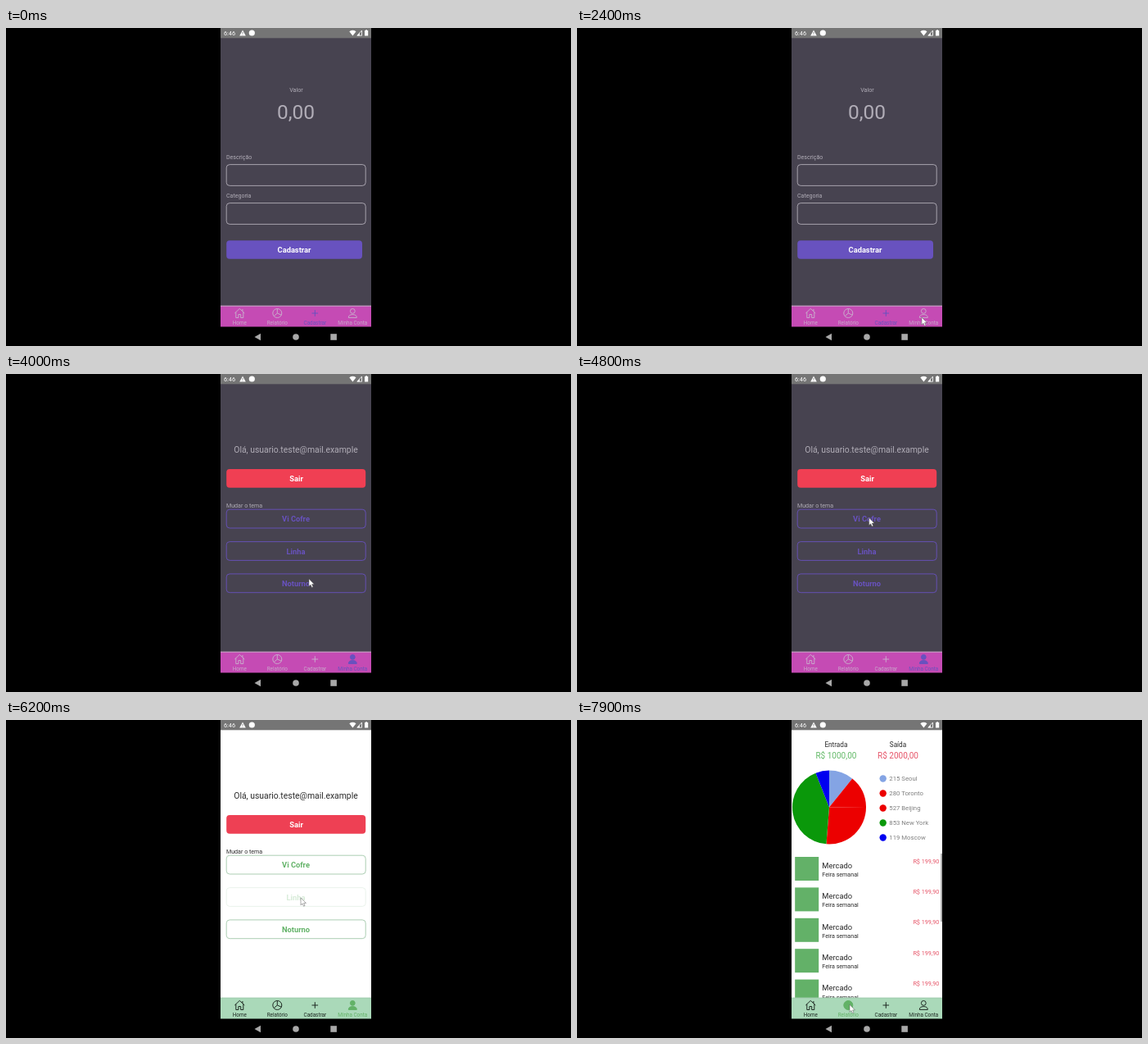
Write an HTML page that moves like this. It is 690 px wide and 388 px high and loops after 8000 ms.

```html
<!DOCTYPE html>
<html lang="pt">
<head>
<meta charset="utf-8">
<title>Controle de gastos</title>
<style>
html, body { margin: 0; height: 100%; overflow: hidden; background: #000; }
svg {
  display: block; width: 100vw; height: 100vh;
  font-family: Roboto, sans-serif;
  --bg: #474350; --text: #b1adb7; --bar: #c54bb4; --edge: #c99bc5; --tab: #c9a9cb;
  --main: #6852bf; --line: #6852bf; --danger: #f03f53;
}
svg.light {
  --bg: #fff; --text: #2b2b2b; --bar: #aad9b9; --edge: #a3cfb1; --tab: #1f2a23;
  --main: #62b267; --line: #a3c9ab; --danger: #ee4054;
}
text { fill: var(--text); }
.bold { font-weight: 700; }
.mid { text-anchor: middle; }
.end { text-anchor: end; }
.tab { color: var(--tab); }
.tab.on { color: var(--main); }
.tab text { fill: currentColor; }
.tab .icon { fill: none; stroke: currentColor; stroke-width: 1; stroke-linejoin: round; }
.tab.on .solid { fill: currentColor; }
</style>
</head>
<body>
<svg id="stage" viewBox="0 0 690 388">
  <defs><clipPath id="page"><rect x="262" y="12" width="184" height="327"/></clipPath></defs>
  <rect width="690" height="388" fill="#000"/>
  <rect x="262" y="12" width="184" height="327.5" fill="var(--bg)"/>

  <rect x="262" width="184" height="12.3" fill="#757575"/>
  <g fill="#fff">
    <text x="266" y="8.8" font-size="7.3" style="fill:#fff">6:46</text>
    <path d="M289 2.5L292.8 9.5H285.2Z"/>
    <path d="M289 5V7M289 7.7V8.5" stroke="#757575" stroke-width=".8"/>
    <circle cx="300.3" cy="6" r="3.6"/>
    <path d="M419.3 4.2Q423.4 1.3 427.5 4.2L423.4 9.4Z"/>
    <path d="M434.5 3V9.2H428.8Z" fill="none" stroke="#fff" stroke-width=".8"/>
    <path d="M431.8 6V9.2H428.8Z"/>
    <path d="M438 3H439.2V2.2H441V3H442.2V9.5H438Z"/>
  </g>

  <g clip-path="url(#page)">
    <g id="register"></g>
    <g id="account"></g>
    <g id="report"></g>
  </g>
  <rect x="262" y="339" width="184" height="25.5" fill="var(--bar)"/>
  <rect x="262" y="338.6" width="184" height="1.2" fill="var(--edge)"/>
  <g id="tabs"></g>

  <g fill="#a9a9a9">
    <path d="M303.5 377L311 372.8V381.2Z"/>
    <circle cx="354" cy="377" r="3.8"/>
    <rect x="396.3" y="373.2" width="7.6" height="7.6"/>
  </g>
  <path id="cursor" d="M0 0V9L2 7.2L3.5 10.4L5 9.7L3.6 6.6H6.4Z" fill="#fff" stroke="#555" stroke-width=".5"/>
</svg>
<script>
const $ = id => document.getElementById(id);
const LOOP = 8000, STEP = 100;

const text = (x, y, size, str, cls = '', color = 'var(--text)') =>
  `<text x="${x}" y="${y}" font-size="${size}" class="${cls}" style="fill:${color}">${str}</text>`;
const box = (y, h, fill, stroke, w = 170) =>
  `<rect x="269.2" y="${y}" width="${w}" height="${h}" rx="4" fill="${fill}" stroke="${stroke}" stroke-width=".9"/>`;
const themeButton = (y, name) =>
  box(y, 22.8, 'none', 'var(--line)') + text(354, y + 15.2, 9.3, name, 'bold mid', 'var(--main)');

$('register').innerHTML =
  text(354.5, 77.6, 7.2, 'Valor', 'mid') +
  text(354, 111.3, 24.5, '0,00', 'mid') +
  text(269, 160.2, 7.05, 'Descrição') + box(166.6, 25.8, 'none', 'var(--text)') +
  text(269, 207.4, 7.05, 'Categoria') + box(213.6, 25.8, 'none', 'var(--text)') +
  box(259.3, 22.5, 'var(--main)', 'none', 165.8) +
  text(352, 274.3, 9.3, 'Cadastrar', 'bold mid', '#fff');

$('account').innerHTML =
  text(354, 96.2, 10.4, 'Olá, usuario.teste@mail.example', 'mid') +
  box(116, 22.7, 'var(--danger)', 'none') + text(354.5, 130.9, 9.3, 'Sair', 'bold mid', '#fff') +
  text(269, 162.8, 7.1, 'Mudar o tema') +
  themeButton(165.2, 'Vi Cofre') +
  `<g id="pressed">${themeButton(204.6, 'Linha')}</g>` +
  themeButton(243.9, 'Noturno');

const cities = [
  [215, 'Seoul', '#84a4e4'], [280, 'Toronto', '#ec0000'], [527, 'Beijing', '#ec0000'],
  [853, 'New York', '#0a980a'], [119, 'Moscow', '#0000f0']
];
const total = cities.reduce((sum, [n]) => sum + n, 0);
const rim = n => {
  const a = n / total * 2 * Math.PI;
  return `${308 + 45 * Math.sin(a)} ${106.5 - 45 * Math.cos(a)}`;
};
let used = 0;
const chart = cities.map(([n, city, color], i) => {
  const slice = `<path d="M308 106.5L${rim(used)}A45 45 0 0 1 ${rim(used += n)}Z" fill="${color}"/>`;
  const y = 71.5 + 18 * i;
  return slice + `<circle cx="373.7" cy="${y}" r="4.2" fill="${color}"/>` +
    text(381.3, y + 2.6, 7.75, `${n} ${city}`, '', '#7f7f7f');
}).join('');
const purchases = Array.from({ length: 5 }, (_, i) => {
  const y = 167 + 37.4 * i;
  return `<rect x="266.2" y="${y}" width="29" height="29" fill="#63b168"/>` +
    text(299.3, y + 13.8, 9.4, 'Mercado') +
    text(299.3, y + 24, 7.15, 'Feira semanal') +
    text(442.3, y + 7.6, 7.2, 'R$ 199,90', 'end', '#e65367');
}).join('');
$('report').innerHTML =
  text(316.4, 33.2, 8.2, 'Entrada', 'mid') + text(316.4, 47.2, 10, 'R$ 1000,00', 'mid', '#62b967') +
  text(392, 33.2, 8.2, 'Saída', 'mid') + text(392, 47.2, 10, 'R$ 2000,00', 'mid', '#e65367') +
  chart + purchases + '<rect x="444.2" y="163" width="1.8" height="83" fill="#aaa"/>';

// Icons are drawn around the tab centre.
const tabs = [
  ['Home', '<path d="M-6 0L0-5.6L6 0M-4.5-1.4V5.5H-1.4V1.5H1.4V5.5H4.5V-1.4M3.6-5V-2.2"/>'],
  ['Relatório', '<circle class="solid" r="5.5"/><path d="M0-5.5V0L5 2.2M0 0L-4.2 3.6"/>'],
  ['Cadastrar', '<path d="M-3.8 0H3.8M0-3.8V3.8"/>'],
  ['Minha Conta', '<circle class="solid" cy="-2.6" r="2.9"/><path class="solid" d="M-5 5.4Q-5 1.6 0 1.6T5 5.4Z"/>']
];
$('tabs').innerHTML = tabs.map(([name, icon], i) =>
  `<g class="tab" transform="translate(${285.3 + 46 * i} 348)"><g class="icon">${icon}</g>` +
  `<text class="mid" y="14.4" font-size="6.35">${name}</text></g>`).join('');

// Keyframes: time, then values.
const path = [
  [1400, 352, 266], [2200, 408, 342], [2400, 421, 353], [3600, 421, 353],
  [4000, 370, 250], [4200, 357.3, 211], [4500, 357.3, 211], [4800, 356.7, 175.5],
  [5000, 356.7, 175.5], [5300, 360, 216.8], [6800, 360, 216.8], [7400, 333, 347.3]
];
const press = [[5300, 1], [5500, .15], [6100, .15], [6200, .25], [6500, 1]];

function at(keys, t) {
  const next = keys.findIndex(k => k[0] > t);
  if (next === 0) return keys[0].slice(1);
  if (next < 0) return keys[keys.length - 1].slice(1);
  const a = keys[next - 1], b = keys[next], p = (t - a[0]) / (b[0] - a[0]);
  return a.slice(1).map((v, i) => v + (b[i + 1] - v) * p);
}

function draw(now) {
  const t = Math.floor(now % LOOP / STEP) * STEP;
  const page = t < 3400 ? 'register' : t < 7800 ? 'account' : 'report';
  const active = { report: 1, register: 2, account: 3 }[page];
  for (const id of ['register', 'account', 'report'])
    $(id).style.display = id === page ? '' : 'none';
  [...$('tabs').children].forEach((tab, i) => tab.classList.toggle('on', i === active));
  $('stage').classList.toggle('light', t >= 6200);
  $('pressed').style.opacity = at(press, t)[0];
  $('cursor').style.display = t < 1400 ? 'none' : '';
  $('cursor').setAttribute('transform', `translate(${at(path, t).join(' ')})`);
}

const start = performance.now();
(function tick() {
  draw(performance.now() - start);
  requestAnimationFrame(tick);
})();
</script>
</body>
</html>
```
